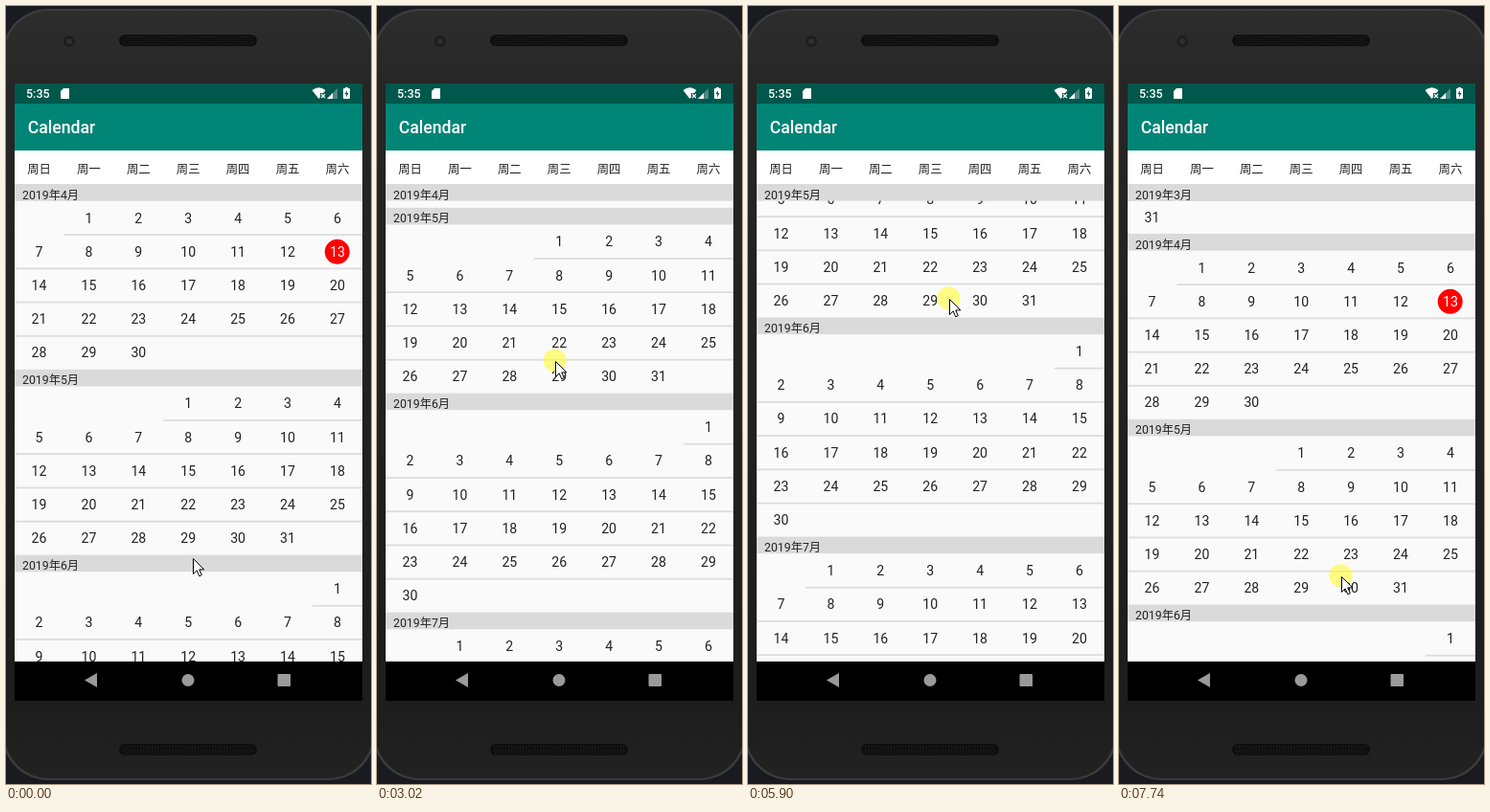
These frames come from a looping animation (381x813 px, 8000 ms). An HTML page with a canvas:

```html
<!DOCTYPE html>
<html lang="zh">
<head>
<meta charset="utf-8">
<title>Calendar</title>
<style>
html, body { margin: 0; width: 100%; height: 100%; overflow: hidden; background: #191b20; }
canvas { display: block; width: 381px; height: 813px; }
</style>
</head>
<body>
<canvas id="stage" width="381" height="813"></canvas>
<script>
const ctx = document.getElementById('stage').getContext('2d');
const FONT = 'Roboto, "Noto Sans CJK SC", "Noto Sans CJK", sans-serif';
const LOOP = 8000, STEP = 77.5, PHASE = 65;
const LEFT = 9, WIDTH = 363, TOP = 186, BOTTOM = 685;
const COL = 51.9, ROW = 35.24, HEAD = 17.6;
const PRESS = 6;

// The drag: step number, list scroll and pointer position
const drag = [
  { step: 0, scroll: 0, x: 195, y: 577 },
  { step: PRESS, scroll: 0, x: 187, y: 533 },
  { step: 8, scroll: 0, x: 187, y: 533 },
  { step: 20, scroll: 28.4, x: 180, y: 511 },
  { step: 38, scroll: 169, x: 186, y: 371 },
  { step: 49, scroll: 278.4, x: 194, y: 257 },
  { step: 62, scroll: 373, x: 197, y: 175 },
  { step: 66, scroll: 368.7, x: 197, y: 179 },
  { step: 84, scroll: 84.6, x: 226, y: 473 },
  { step: 99, scroll: -52, x: 232, y: 596 }
];

const months = [];
for (let m = 2, y = 0; m < 10; m++) {
  const first = new Date(2019, m, 1).getDay();
  const days = new Date(2019, m + 1, 0).getDate();
  const rows = Math.ceil((first + days) / 7);
  const height = HEAD + rows * ROW;
  if (m === 2) y = -height;
  months.push({ number: m + 1, first, days, rows, y, height });
  y += height;
}

// Monotone cubic through the drag points, so turns never overshoot
function follow(step, prop) {
  const last = drag.length - 1;
  const slope = i => (drag[i + 1][prop] - drag[i][prop]) / (drag[i + 1].step - drag[i].step);
  const tangent = i => {
    if (i === 0 || i === last) return 0;
    const a = slope(i - 1), b = slope(i);
    return a * b > 0 ? 2 * a * b / (a + b) : 0;
  };
  if (step >= drag[last].step) return drag[last][prop];
  const i = drag.findIndex((p, n) => step < drag[n + 1].step);
  const a = drag[i], b = drag[i + 1], span = b.step - a.step;
  const u = (step - a.step) / span, v = 1 - u;
  return a[prop] * v * v * (1 + 2 * u) + b[prop] * u * u * (3 - 2 * u)
    + span * u * v * (tangent(i) * v - tangent(i + 1) * u);
}

function box(x, y, w, h, color) {
  ctx.fillStyle = color;
  ctx.fillRect(x, y, w, h);
}

function round(x, y, w, h, r, color) {
  ctx.fillStyle = color;
  ctx.beginPath();
  ctx.roundRect(x, y, w, h, r);
  ctx.fill();
}

function disc(x, y, r, color) {
  ctx.fillStyle = color;
  ctx.beginPath();
  ctx.arc(x, y, r, 0, Math.PI * 2);
  ctx.fill();
}

function shape(path, color) {
  ctx.fillStyle = color;
  ctx.fill(new Path2D(path));
}

function text(str, x, y, size, color, align = 'left', weight = 400) {
  ctx.font = `${weight} ${size}px ${FONT}`;
  ctx.textAlign = align;
  ctx.fillStyle = color;
  ctx.fillText(str, x, y);
}

const colX = c => 34.5 + COL * c;

function speaker(y) {
  round(118, y, 144, 12, 6, '#0e0e0e');
  for (let r = 0; r < 4; r++)
    for (let x = 122 + r % 2; x < 258; x += 3) box(x, y + 2 + r * 2.5, 1, 1, '#2c2c2c');
}

function drawPhone() {
  box(0, 0, 381, 813, '#191b20');
  round(-4, 3, 389, 806, 48, '#3c3c3c');
  const body = ctx.createLinearGradient(0, 5, 0, 808);
  body.addColorStop(0, '#2d2d2d');
  body.addColorStop(0.1, '#262626');
  body.addColorStop(0.9, '#1d1d1d');
  body.addColorStop(1, '#222');
  round(-2, 5, 385, 802, 47, body);
  speaker(30);
  speaker(771);
  disc(66, 37, 6, '#1e1e1e');
  disc(66, 37, 3, '#2c2f33');
}

function drawStatus() {
  const bar = '#00574b';
  box(LEFT, 81, WIDTH, 21, bar);
  text('5:35', 21, 96, 12.5, '#fff', 'left', 500);
  shape('M60 86h6v11h-9v-8z', '#fff');
  shape('M326.5 97l-7-9q7-5.5 14 0z', '#fff');
  box(328, 91, 6, 6, bar);
  ctx.strokeStyle = '#fff';
  ctx.lineWidth = 1.2;
  ctx.stroke(new Path2D('M329 92l4 4m0-4l-4 4'));
  shape('M346 86v11h-11z', '#4d8981');
  shape('M341 91v6h-6z', '#fff');
  box(354, 85, 3, 2, '#fff');
  round(352, 86, 7, 11, 1, '#fff');
  shape('M356 88l-2.5 4h1.7l-.2 3.5 2.5-4.5h-1.7z', bar);
}

function drawBars() {
  drawStatus();
  box(LEFT, 102, WIDTH, 49, '#008577');
  text('Calendar', 22.7, 133, 17.65, '#fff', 'left', 500);
  box(LEFT, 151, WIDTH, 35, '#fff');
  [...'日一二三四五六'].forEach((d, i) => text('周' + d, colX(i), 174.5, 12.36, '#222', 'center'));

  box(LEFT, BOTTOM, WIDTH, 726 - BOTTOM, '#000');
  shape('M82 704.5l13-7.5v15z', '#9a9a9a');
  disc(190, 704.5, 6.5, '#9a9a9a');
  round(283.5, 698, 13.5, 13, 1, '#9a9a9a');
}

function drawHeader(month, y) {
  box(LEFT, y, WIDTH, HEAD, '#dadada');
  text(`2019年${month.number}月`, 17, y + 15.5, 12.3, '#222');
}

function drawMonth(month, y) {
  drawHeader(month, y);
  for (let r = 0; r < month.rows - 1; r++) {
    const x = r ? LEFT : colX(month.first) - COL / 2;
    box(x, y + HEAD + (r + 1) * ROW - 0.6, LEFT + WIDTH - x, 1.8, '#dcdcdc');
  }
  for (let d = 1; d <= month.days; d++) {
    const cell = month.first + d - 1;
    const x = colX(cell % 7);
    const cy = y + HEAD + (Math.floor(cell / 7) + 0.5) * ROW;
    const today = month.number === 4 && d === 13;
    if (today) disc(x - 0.2, cy + 0.4, 13, '#f00');
    text(d, x, cy + 5.3, 14.1, today ? '#fff' : '#222', 'center');
  }
}

function drawList(scroll) {
  ctx.save();
  ctx.beginPath();
  ctx.rect(LEFT, TOP, WIDTH, BOTTOM - TOP);
  ctx.clip();
  box(LEFT, TOP, WIDTH, BOTTOM - TOP, '#fafafa');
  let current = months[0];
  for (const month of months) {
    const y = TOP + month.y - scroll;
    if (y <= TOP) current = month;
    if (y < BOTTOM && y + month.height > TOP) drawMonth(month, y);
  }
  // The next month pushes the pinned header away
  const next = TOP + current.y + current.height - scroll;
  drawHeader(current, Math.min(TOP, next - HEAD));
  ctx.restore();
}

function drawPointer(x, y, pressed) {
  if (pressed) disc(x - 0.5, y - 0.8, 12, 'rgba(255,252,60,.62)');
  ctx.save();
  ctx.translate(x + 0.5, y + 0.5);
  const arrow = new Path2D('M0 0v16l3.7-3.6 2.6 5.9 2.5-1.1-2.5-5.8h5z');
  ctx.fillStyle = '#fff';
  ctx.fill(arrow);
  ctx.strokeStyle = '#000';
  ctx.lineWidth = 1;
  ctx.stroke(arrow);
  ctx.restore();
}

function frame() {
  const t = performance.now() % LOOP;
  const step = Math.max(0, Math.floor((t - PHASE) / STEP));
  drawPhone();
  drawBars();
  drawList(follow(step, 'scroll'));
  drawPointer(Math.round(follow(step, 'x')), Math.round(follow(step, 'y')), step >= PRESS);
  requestAnimationFrame(frame);
}
frame();
</script>
</body>
</html>
```
